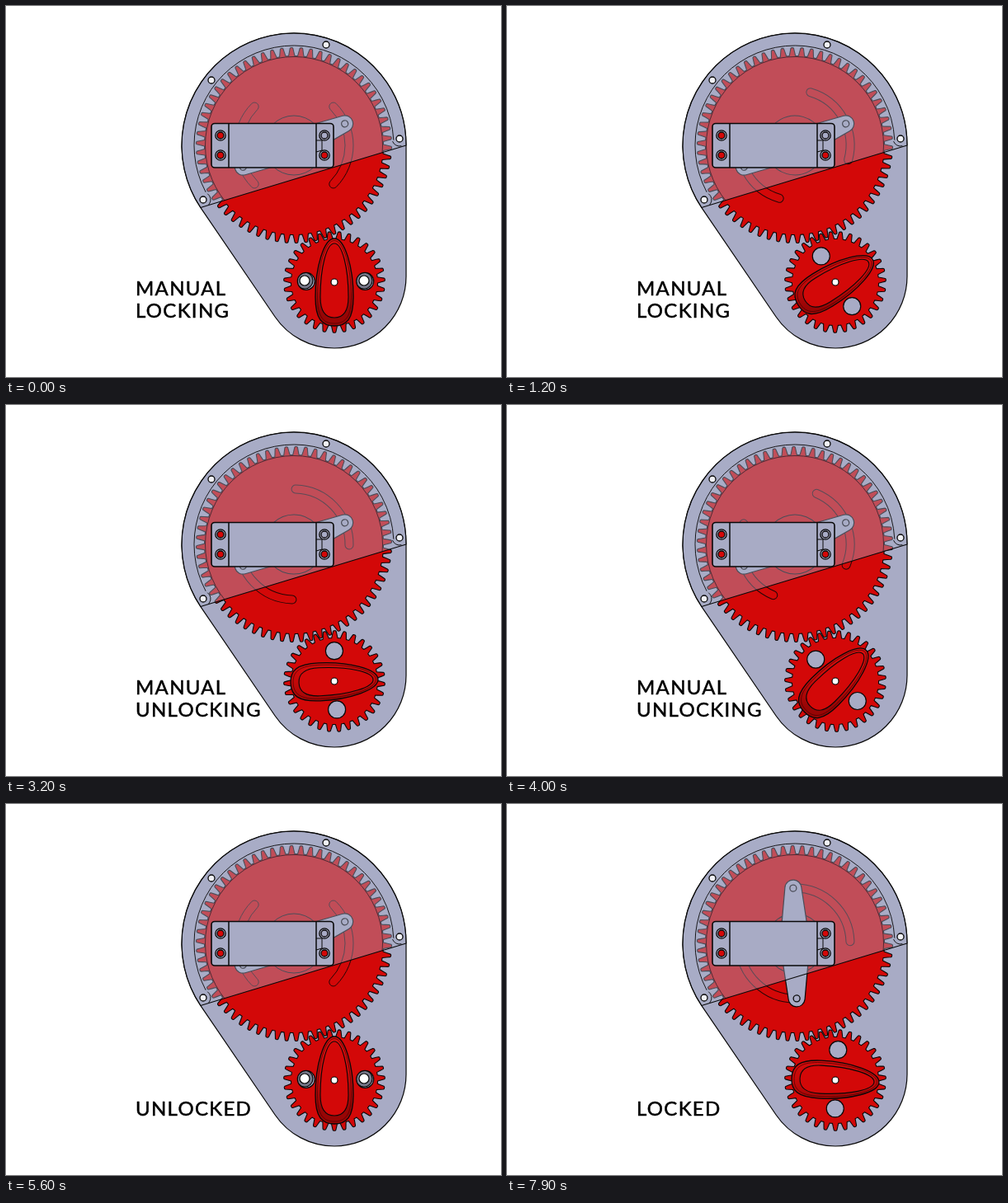
An HTML page with a canvas that plays this animation: 600x450 px, repeating every 8000 ms.

```html
<!DOCTYPE html>
<html lang="en">
<head>
<meta charset="utf-8">
<title>Gear lock</title>
<style>
html, body { margin: 0; width: 100%; height: 100%; overflow: hidden; background: #fff; }
canvas { display: block; width: 600px; height: 450px; }
</style>
</head>
<body>
<canvas id="stage" width="600" height="450"></canvas>
<script>
const ctx = document.getElementById('stage').getContext('2d');
const LOOP = 8000, TAU = Math.PI * 2, RAD = Math.PI / 180;
const GRAY = '#a8abc5', RED = '#d30808', INK = '#080808';
const BIG = { x: 349, y: 169 }, SMALL = { x: 398, y: 335 };
const SMALL_TEETH = 31, BIG_TEETH = 62;

const CAPTIONS = [
  [0, 'MANUAL', 'LOCKING'],
  [2000, '', 'LOCKED'],
  [3000, 'MANUAL', 'UNLOCKING'],
  [5000, '', 'UNLOCKED'],
  [5900, 'POWERED', 'LOCKING'],
  [7800, '', 'LOCKED']
];

function ease(t, start, duration) {
  const s = Math.min(1, Math.max(0, (t - start) / duration));
  return s * s * (3 - 2 * s);
}

// The arm swings freely until it reaches the slot end, then drives the gears.
function poseAt(t) {
  const swing = 70 * ease(t, 6240, 1800);
  const manual = 90 * (ease(t, 0, 2000) - ease(t, 3000, 2000));
  const knob = manual + 2 * Math.max(0, swing - 22.4);
  return { knob: knob * RAD, wheel: -knob / 2 * RAD, arm: (-23 - swing) * RAD };
}

function paint(fill, line = 1.2, color = INK) {
  if (fill) { ctx.fillStyle = fill; ctx.fill(); }
  if (line) { ctx.lineWidth = line; ctx.strokeStyle = color; ctx.stroke(); }
}

function circle(x, y, r, fill, line, color) {
  ctx.beginPath();
  ctx.arc(x, y, r, 0, TAU);
  paint(fill, line, color);
}

function line(points, width = 1) {
  ctx.beginPath();
  points.forEach(([x, y]) => ctx.lineTo(x, y));
  paint(null, width);
}

function placed(center, angle, draw) {
  ctx.save();
  ctx.translate(center.x, center.y);
  ctx.rotate(angle);
  draw();
  ctx.restore();
}

function gearPath(teeth, root, tip, phase) {
  const step = TAU / teeth;
  const profile = [[-0.5, root], [-0.34, root], [-0.23, (root + tip) / 2],
    [-0.15, tip - 0.8], [-0.08, tip], [0.08, tip], [0.15, tip - 0.8],
    [0.23, (root + tip) / 2], [0.34, root]];
  ctx.beginPath();
  for (let i = 0; i < teeth; i++) {
    for (const [offset, r] of profile) {
      const a = phase + (i + offset) * step;
      ctx.lineTo(r * Math.cos(a), r * Math.sin(a));
    }
  }
  ctx.closePath();
}

function drawHousing() {
  const left = 145.75 * RAD;
  ctx.beginPath();
  ctx.arc(BIG.x, BIG.y, 136, left, TAU);
  ctx.arc(398, 328, 87, 0, left);
  ctx.closePath();
  paint(GRAY, 1.2);
}

function drawWheel(angle) {
  placed(BIG, angle, () => {
    gearPath(BIG_TEETH, 108.5, 118.5, 1.46 * RAD);
    paint(RED, 1.1);
    for (const side of [0, Math.PI]) {
      const a = side - 44.5 * RAD, b = side + 44.5 * RAD;
      ctx.beginPath();
      ctx.arc(0, 0, 72, a, b);
      ctx.arc(67 * Math.cos(b), 67 * Math.sin(b), 5, b, b + Math.PI);
      ctx.arc(0, 0, 62, b, a, true);
      ctx.arc(67 * Math.cos(a), 67 * Math.sin(a), 5, a + Math.PI, a + TAU);
      ctx.closePath();
      paint(null, 1, '#260505');
    }
    circle(0, 0, 36, null, 1);
  });
}

function drawArm(angle) {
  placed(BIG, angle, () => {
    const tilt = Math.acos(8 / 67);
    ctx.beginPath();
    ctx.arc(67, 0, 10, -tilt, tilt);
    ctx.arc(0, 0, 18, tilt, Math.PI - tilt);
    ctx.arc(-67, 0, 10, Math.PI - tilt, Math.PI + tilt);
    ctx.arc(0, 0, 18, Math.PI + tilt, TAU - tilt);
    ctx.closePath();
    paint(GRAY, 1.2);
    circle(67, 0, 4, GRAY, 1.3);
    circle(-67, 0, 4, GRAY, 1.3);
  });
}

function coverPath() {
  ctx.beginPath();
  ctx.arc(BIG.x, BIG.y, 136, 146.3 * RAD, TAU);
  ctx.closePath();
}

function drawCover() {
  ctx.save();
  coverPath();
  ctx.globalAlpha = 0.42;
  paint(GRAY, 0);
  ctx.globalAlpha = 1;
  coverPath();
  ctx.clip();
  circle(BIG.x, BIG.y, 107.5, null, 0.8, '#33202a');
  ctx.beginPath();
  ctx.arc(BIG.x, BIG.y, 121, 152 * RAD, 357 * RAD);
  paint(null, 0.9);
  ctx.beginPath();
  ctx.arc(477, 161, 9, 75 * RAD, 160 * RAD);
  paint(null, 0.9);
  ctx.beginPath();
  ctx.arc(239, 235, 9, -55 * RAD, 50 * RAD);
  paint(null, 0.9);
  ctx.restore();
  coverPath();
  paint(null, 1.1);
  for (const [x, y] of [[388, 47], [249, 90], [477, 161], [239, 235]])
    circle(x, y, 4, '#f0f1f6', 1.3);
}

function drawMotor(armAngle) {
  const screws = [[260, 157], [260, 181], [386, 157], [386, 181]];
  ctx.beginPath();
  ctx.roundRect(249, 142.5, 148, 53.5, 4);
  paint(GRAY, 1.6);
  line([[270, 143], [270, 196]], 1.5);
  line([[376, 143], [376, 196]], 1.5);
  line([[376, 163], [383, 163], [383, 175], [376, 177]], 1);
  for (const [x, y] of screws) {
    circle(x, y, 6.2, GRAY, 1.3);
    ctx.save();
    circle(x, y, 4, RED, 0);
    ctx.clip();
    drawArm(armAngle);
    ctx.restore();
    circle(x, y, 4, null, 1.3);
  }
}

function dropPath(tip, width, bottom) {
  ctx.beginPath();
  ctx.moveTo(0, tip);
  ctx.bezierCurveTo(width * 0.55, tip, width, -18, width, 18);
  ctx.bezierCurveTo(width, bottom - 8, width * 0.65, bottom, 0, bottom);
  ctx.bezierCurveTo(-width * 0.65, bottom, -width, bottom - 8, -width, 18);
  ctx.bezierCurveTo(-width, -18, -width * 0.55, tip, 0, tip);
  ctx.closePath();
}

function drawKnobGear(angle) {
  placed(SMALL, angle, () => {
    gearPath(SMALL_TEETH, 52.5, 61.3, 90 * RAD);
    paint(RED, 1.1);
  });

  // Gear holes reveal the two fixed bores in the housing.
  for (const side of [-1, 1]) {
    const x = 399.5 + side * 35.7 * Math.cos(angle);
    const y = 333.8 + side * 35.7 * Math.sin(angle);
    ctx.save();
    circle(x, y, 10.5, GRAY, 0);
    ctx.clip();
    for (const bore of [362, 434]) {
      circle(bore, 333, 10, '#77788a', 1.2);
      circle(bore, 333, 6, '#fff', 1.2);
    }
    ctx.restore();
    circle(x, y, 10.5, null, 1.2);
  }

  // Light always falls from the top of the stage.
  const shade = ctx.createLinearGradient(0, 300, 0, 366);
  shade.addColorStop(0, '#d80c0c');
  shade.addColorStop(0.5, '#c60909');
  shade.addColorStop(1, '#980505');
  placed(SMALL, angle, () => {
    dropPath(-53, 23, 53);
    ctx.setTransform(1, 0, 0, 1, 0, 0);
    paint(shade, 1.3);
  });
  placed(SMALL, angle, () => {
    dropPath(-50.5, 20.5, 50);
    paint(null, 0.7, '#4a0202');
    dropPath(-47, 17, 43);
    paint(RED, 1.1);
  });
  circle(SMALL.x, SMALL.y, 4, '#fff', 1.2);
}

function drawCaption(t) {
  const [, top, bottom] = CAPTIONS.findLast(([start]) => t >= start);
  ctx.font = '24px Lato, sans-serif';
  ctx.letterSpacing = '1.3px';
  ctx.fillStyle = ctx.strokeStyle = '#000';
  ctx.lineWidth = 0.5;
  [[top, 350.5], [bottom, 377.5]].forEach(([text, y]) => {
    ctx.fillText(text, 157, y);
    ctx.strokeText(text, 157, y);
  });
}

function render(now) {
  const t = now % LOOP;
  const pose = poseAt(t);
  ctx.fillStyle = '#fff';
  ctx.fillRect(0, 0, 600, 450);
  ctx.lineJoin = 'round';
  drawHousing();
  drawWheel(pose.wheel);
  drawArm(pose.arm);
  drawCover();
  drawMotor(pose.arm);
  drawKnobGear(pose.knob);
  drawCaption(t);
}

const begin = performance.now();
function tick() {
  render(performance.now() - begin);
  requestAnimationFrame(tick);
}
tick();
</script>
</body>
</html>
```
